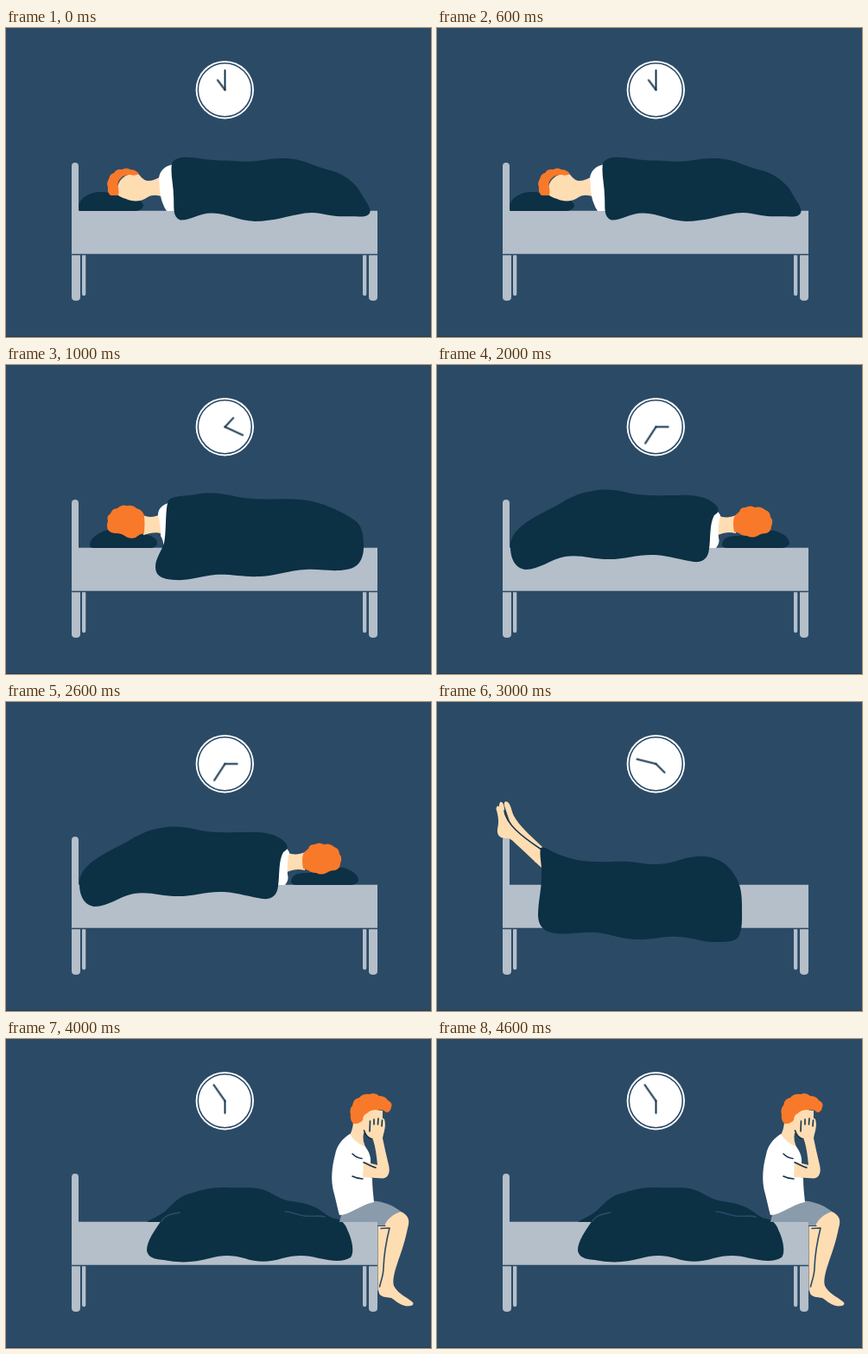
Recreate the animation shown at these times as an HTML page without scripts. Size 492 by 358 pixels, loop 5 s.

```html
<!DOCTYPE html>
<html lang="en">
<head>
<meta charset="utf-8">
<title>Restless night</title>
<style>
  html, body { margin: 0; width: 100%; height: 100%; overflow: hidden; background: #2b4a66; }
  svg { display: block; width: 100%; height: 100%; }
  .bed { fill: #b4bfca; }
  .cloth { fill: #0c3044; }
  .skin { fill: #ffddb3; }
  .hair { fill: #f9792a; }
  .shirt { fill: #fff; }
  .shorts { fill: #8a9bab; }
  .fold { fill: none; stroke: #2b4a66; stroke-width: 1.6; stroke-linecap: round; stroke-linejoin: round; }
  .ink { fill: none; stroke: #14324a; stroke-width: 1.6; stroke-linecap: round; stroke-linejoin: round; }
  .hand { stroke: #14324a; stroke-width: 2; stroke-linecap: round; transform-origin: 253.5px 71.7px; }
  .hour { animation: hour 5s step-end infinite; }
  .minute { animation: minute 5s step-end infinite; }
  .pose { visibility: hidden; animation: pose 5s step-end calc(var(--i) * 1s - 5s) infinite; }
  @keyframes pose { 0% { visibility: visible; } 20%, 100% { visibility: hidden; } }
  @keyframes hour {
    0% { transform: rotate(-37deg); }
    20% { transform: rotate(43deg); }
    40% { transform: rotate(90deg); }
    60% { transform: rotate(135deg); }
    80%, 100% { transform: rotate(180deg); }
  }
  @keyframes minute {
    0% { transform: rotate(0deg); }
    20% { transform: rotate(115deg); }
    40% { transform: rotate(213deg); }
    60% { transform: rotate(284deg); }
    80%, 100% { transform: rotate(325deg); }
  }
</style>
</head>
<body>
<svg viewBox="0 0 492 358">
  <rect width="492" height="358" fill="#2b4a66"/>
  <rect y="357" width="492" height="1" fill="#213c54"/>

  <!-- clock -->
  <circle cx="253.3" cy="71.7" r="33.7" fill="#fff"/>
  <circle cx="253.3" cy="71.7" r="31" fill="none" stroke="#2b4a66" stroke-width="1.6"/>
  <path class="hand hour" d="M253.500 71.700V57.500"/>
  <path class="hand minute" d="M253.500 71.700V49"/>

  <!-- bed -->
  <g class="bed">
    <path d="M76 261.700V160Q76 156 80 156Q84 156 84 160V211.700H430V261.700Z"/>
    <path id="leg" d="M76 263.200H86V312Q86 316 81 316Q76 316 76 312Z"/>
    <path id="back" d="M88 263.200H92.300V308Q92.300 310.300 90.200 310.300Q88 310.300 88 308Z"/>
    <use href="#leg" x="344"/>
    <use href="#back" x="325"/>
  </g>

  <!-- on the side, facing out -->
  <g class="pose" style="--i:0">
    <path class="cloth" d="M85 212C82 202 88 196 98 192C109 188 121 191 135 194C148 196 157 199 159 205C159 209 155 212 149 212Z"/>
    <path class="skin" d="M129 193C127 180 134 169 151 168C156 170 157 176 164 177C170 177 175 175 180 171L183 197C177 193 169 193 164 196C156 202 145 201 139 198Q132 196 129 193Z"/>
    <path class="hair" d="M121 194Q117 191 118 185Q116 179 119 175Q120 169 125 168Q128 163 134 164Q140 161 144 164Q150 164 154 169Q149 172 144 170Q136 170 133 174Q128 178 130 185Q131 190 130 194Z"/>
    <path class="shirt" d="M193 158C184 160 178 165 177 174C178 185 178 194 181 202Q183 208 186 212H197Z"/>
    <path class="cloth" d="M192 157C196 148 212 149 226 151.500C240 154 256 153 270 154.500C290 156 304 150 324 151C346 152 357 161 376 165C391 169 402 178 409 188C413 196 420 204 421.500 211C422 217 416 219 408 218.500C394 218 386 219 375 217C365 215 357 213 346 214.500C329 217 310 224 288 224C268 223 257 215 239 214.500C224 214 214 223 202 222.500C192 219 195 206 194 195C194 182 190 168 192 157Z"/>
  </g>

  <!-- on the side, facing away -->
  <g class="pose" style="--i:1">
    <path class="cloth" d="M97 209C97 201 105 196 114 192C126 188 139 193 154 195C168 197 175 200 175 207Q174 212 166 212H102Q97 212 97 209Z"/>
    <path class="skin" d="M157 173C164 177 172 177 180 172L182 196C175 193 168 194 159 197Z"/>
    <path class="hair" d="M118 191Q116 186 118 181Q116 175 121 172Q123 166 129 166Q134 161 140 163Q147 162 151 166Q158 168 160 174Q161 184 160 195Q154 196 150 200Q144 202 139 199Q134 195 128 195Q121 195 118 191Z"/>
    <path class="shirt" d="M190 159C181 162 176 166 176 174C179 184 179 191 179 198Q183 204 182 212H194Z"/>
    <path class="cloth" d="M188 157C193 151 209 152 219 150C233 147 246 148 260 151C276 155 292 156 309 155.500C330 155 345 155 362 160C381 166 394 173 405 181C414 188 414 203 414 213C413 226 408 235 394 237C377 240 365 236 347 237C327 238 314 244 294 245C274 246 261 242 242 243C224 245 211 250 195 249C180 248 173 244 173 234C173 224 180 216 183 206C186 193 184 166 188 157Z"/>
  </g>

  <!-- turned end to end -->
  <g class="pose" style="--i:2">
    <path class="cloth" d="M330 208C331 200 338 198 348 198C363 197 377 190 391 192C401 195 408 200 408 207Q406 212 398 212H337Q330 212 330 208Z"/>
    <path class="skin" d="M324 173C331 178 339 177 346 174V195C338 193 333 194 325 197Z"/>
    <path class="hair" d="M344 176Q347 172 350 170Q351 165 357 165Q363 162 368 165Q375 163 380 168Q386 170 386 176Q390 181 387 187Q387 193 381 195Q375 195 371 198Q365 201 359 198Q353 198 350 195L344 193Q342 183 344 176Z"/>
    <path class="shirt" d="M313 167Q325 167 328 174C326 183 325 191 326 200Q328 206 323 212H310Z"/>
    <path class="cloth" d="M85 211C84 201 91 192 100 185C113 175 127 169 140 162C151 155 164 148 180 146C195 143 211 145 226 149C241 152 260 151 278 151C294 150 310 152 319 159C327 165 328 170 321 174C315 185 317 201 315 213C314 224 308 229 297 228C282 226 270 221 252 220C233 219 219 225 199 225C180 225 165 219 148 222C132 225 118 237 103 237C90 236 85 223 85 211Z"/>
  </g>

  <!-- feet up on the headboard -->
  <g class="pose" style="--i:3">
    <path class="skin" d="M78 120C77 116 79 114 82 116C86 120 86 126 89 132C95 143 106 153 122 168V186H114L84 138Z"/>
    <path class="skin" d="M68.500 124Q69 119 72 121Q72 115 75 116C79 119 77 126 80 132C84 141 90 147 97 153C104 160 112 165 121 170V192C111 183 102 174 92 165C87 160 84 157 79 158C73 158 69 154 70 147C72 139 71 132 68.500 124Z"/>
    <path class="ink" d="M78 126C79 134 84 141 91 148C100 157 109 163 121 171"/>
    <path class="cloth" d="M120 169C125 167 130 172 137 175C151 181 166 185 183 185C201 186 213 183 231 186C248 189 263 189 278 184C290 180 303 177 317 180C333 184 340 193 346 203C352 213 353 224 353 237C353 250 354 263 349 272C344 279 332 278 319 278C305 278 294 272 278 272C261 271 249 276 232 275C214 275 202 269 185 267C168 266 151 270 137 268C122 266 117 258 117 246C117 232 121 217 121 202C122 189 118 178 120 169Z"/>
  </g>

  <!-- sitting on the edge -->
  <g class="pose" style="--i:4">
    <path class="cloth" d="M163 212C171 207 180 204 187 197C195 189 201 182 213 179C227 175 237 171.500 253 172C268 173 284 171 296 174C309 178 316 186 330 188C346 190 357 193 366 200Q376 208 388 212Z"/>
    <path class="cloth" d="M201 200C191 203 183 205 178 213C172 222 163 234 163 245C165 256 177 255 189 257C206 260 221 258 236 254C250 250 262 250 276 254C291 259 304 259 320 254C335 250 348 250 362 254C376 257 390 259 399 253C404 247 400 231 396 223C393 214 389 211 385 209L320 196Z"/>
    <path class="fold" d="M180 211C184 204 191 203 201 201M323 200C331 200 336 204 346 205C355 206 362 204 369 206"/>
    <path class="skin" d="M430.500 217H444L436 282L430.500 292Z"/>
    <path class="skin" d="M434 211C440 200 449 196 457 200C466 204 468 210 465 219C462 234 458 246 454 257C450 269 447 279 449 286C454 296 468 301 471.500 306Q472 309.500 464 309.500C457 309 452 304 446 300C440 299 432 299 431.500 293C430 288 434 280 435 272C437 258 438 240 442 219Z"/>
    <path class="fold" stroke-width="2.4" d="M434 219.500L444 219C440 235 437.500 251 437 265C437 274 434 280 432.500 287"/>
    <path class="shorts" d="M388 204C401 191 417 187 430 188C441 190 450 194 457 200C448 203 442 208 438 216H430V212H386Z"/>
    <path class="skin" d="M402 97C401 106 399 111 395 114L417 127Q412 117 414 109L424 106L436 96V83L412 80Z"/>
    <path class="shirt" d="M398 110C389 116 383 123 381 134C377 149 376 163 379 176C382 187 384 197 386 204C398 204 412 191 426 189C425 179 424 171 424 161L415 157L422 144C423 137 420 130 416 125Q404 120 398 110Z"/>
    <path class="skin" d="M414 142L430 146C429 136 428 126 425 117C419 115 416 111 414.500 106Q417 103 421 107L421 93Q423 89 425.500 92Q427 88 430 91Q433 88 434.500 92Q438 91 438.500 95C440 102 437 109 436 115C438 124 440 134 443 146C445 154 443 161 436 161.500L413 160Z"/>
    <path class="ink" d="M414.500 106C416 111 419 115 424 116M421 107L421.500 95M426 99V93M430.500 99L431 92M435 101L435.500 94M401 133C404 136 408 138 412 138.500M414 143C419 145 424 148 428 149M401 159C405 161 409 162 413 162"/>
    <path class="hair" d="M402 98Q398 94 399 88Q397 81 401 77Q402 69 409 68Q413 63 421 64Q427 61 432 66Q439 66 442 71Q448 74 446 79Q445 85 440 85Q436 81 430 82Q421 82 418 86Q413 88 413 94Q409 99 402 98Z"/>
  </g>
</svg>
</body>
</html>
```
